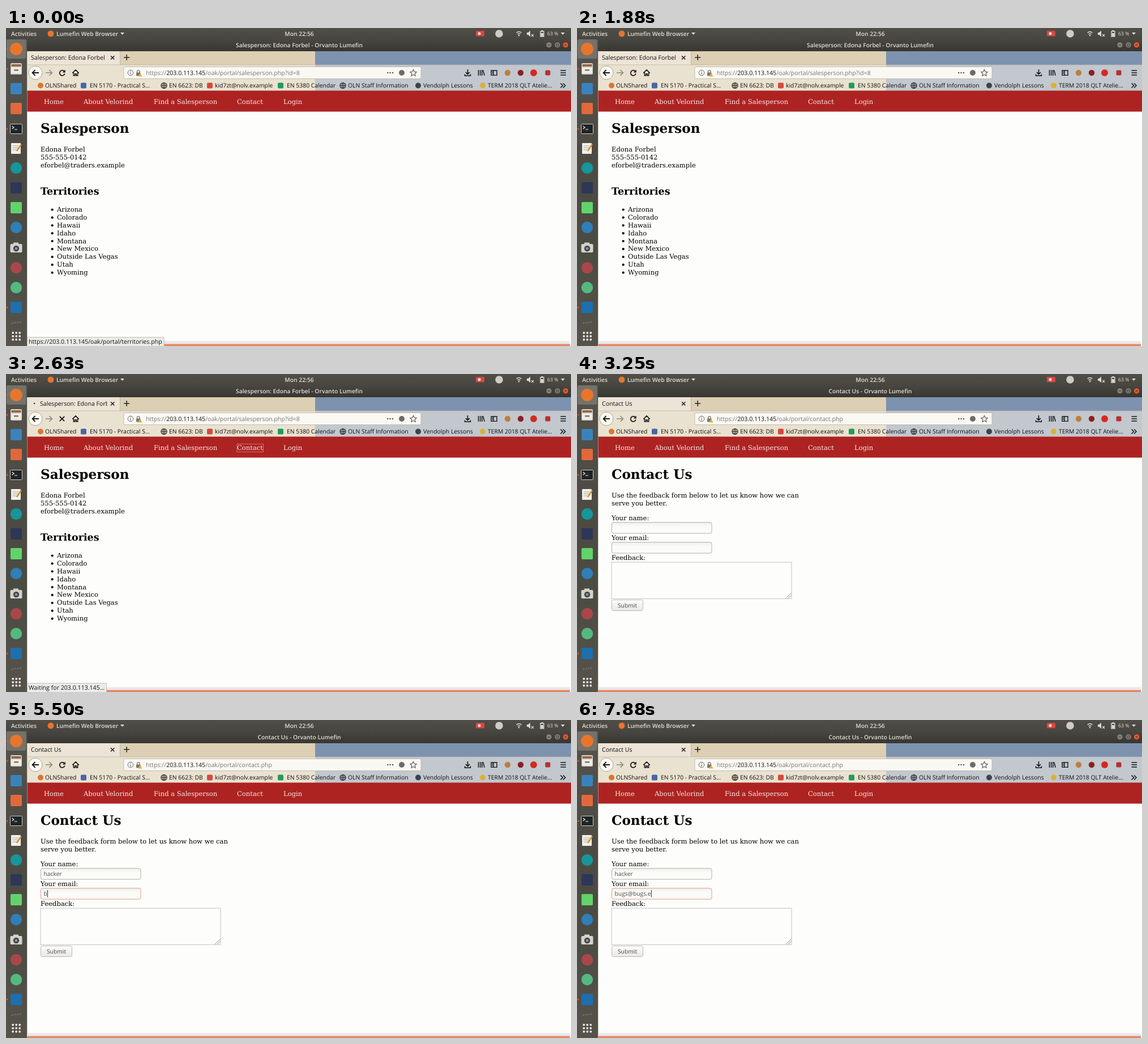
Animation, 998 px wide and 561 px high, one loop 8000 ms. Source, as an HTML page:

```html
<!DOCTYPE html>
<html lang="en">
<head>
<meta charset="utf-8">
<title>Contact form</title>
<style>
  html, body { margin: 0; width: 100%; height: 100%; overflow: hidden; background: #fdfdfb; }
  svg { display: block; width: 998px; height: 561px; }
  text { font: 10.6px "Open Sans", "Noto Sans", sans-serif; fill: #111; white-space: pre; text-rendering: geometricPrecision; }
  .panel { font-size: 10.3px; font-weight: 600; fill: #e2ded6; }
  .mark { font-size: 10.4px; }
  .page { font: 11.57px "DejaVu Serif", serif; fill: #000; }
  .nav { font: 11.57px "DejaVu Serif", serif; fill: #f5e6e4; }
  .h1 { font: bold 23.15px "DejaVu Serif", serif; fill: #000; }
  .h2 { font: bold 17.45px "DejaVu Serif", serif; fill: #000; }
  .field { font-size: 10.3px; fill: #4a4a48; }
  .faint { fill: #777; }
</style>
</head>
<body>
<svg id="stage" viewBox="0 0 998 561">
  <defs>
    <linearGradient id="dock" x2="0" y2="1">
      <stop offset="0" stop-color="#55534b"/><stop offset=".35" stop-color="#4d4b43"/>
      <stop offset=".65" stop-color="#4b4b42"/><stop offset="1" stop-color="#56534b"/>
    </linearGradient>
    <linearGradient id="frame" x2="0" y2="1">
      <stop offset="0" stop-color="#504e47"/><stop offset=".5" stop-color="#474640"/><stop offset="1" stop-color="#383631"/>
    </linearGradient>
    <linearGradient id="button" x2="0" y2="1">
      <stop offset="0" stop-color="#fcfcfa"/><stop offset="1" stop-color="#e9e8e5"/>
    </linearGradient>
    <linearGradient id="input" x2="0" y2="1">
      <stop offset="0" stop-color="#f0f0ed"/><stop offset=".4" stop-color="#fbfbf8"/>
    </linearGradient>
    <clipPath id="tabClip"><rect x="40" y="42" width="139" height="22"/></clipPath>
  </defs>
</svg>
<script>
const stage = document.getElementById('stage');
const $ = id => document.getElementById(id);

const box = (x, y, w, h, fill, more = '') => `<rect x="${x}" y="${y}" width="${w}" height="${h}" fill="${fill}" ${more}/>`;
const dot = (x, y, r, fill, more = '') => `<circle cx="${x}" cy="${y}" r="${r}" fill="${fill}" ${more}/>`;
const line = (d, color = '#151515', width = 1.4, more = '') =>
  `<path d="${d}" fill="none" stroke="${color}" stroke-width="${width}" ${more}/>`;
const shape = (d, fill) => `<path d="${d}" fill="${fill}"/>`;
const text = (x, y, s, cls = '', more = '') => `<text x="${x}" y="${y}" class="${cls}" ${more}>${s}</text>`;
const tile = (x, y, size, fill) => box(x - size / 2, y - size / 2, size, size, fill, 'rx="2"');

const host = '203.0.113.145';
const base = `https://${host}/oak/portal/`;
const person = 'Edona Forbel';
const appName = 'Orvanto Lumefin';

function desktop() {
  let s = box(0, 0, 998, 41, 'url(#frame)') + box(0, 20, 37.5, 541, 'url(#dock)');
  s += text(9, 13.5, 'Activities', 'panel') + dot(79, 10, 5.5, '#e8752c')
    + text(89, 13.5, 'Lumefin Web Browser', 'panel') + shape('M202 8h7l-3.5 4z', '#e2ded6')
    + text(518, 13.5, 'Mon 22:56', 'panel', 'text-anchor="middle"');
  // status area
  s += box(830, 5, 15, 9.5, '#d94742', 'rx="1.5"') + dot(836, 9.8, 2.6, '#f3dcd8')
    + dot(871, 10, 6.8, '#cfccc5')
    + line('M901.5 8.5q4.5-4 9 0M903.5 11q2.5-2 5 0', '#dfdbd2', 1.5) + dot(906, 13.3, 1.2, '#dfdbd2')
    + shape('M920 8h2.5l3.5-3.5v11l-3.5-3.5H920z', '#dfdbd2') + line('M928 11l4 4m0-4l-4 4', '#dfdbd2', 1.1)
    + line('M944 6h6v9h-6zM945.5 4.6h3', '#dfdbd2', 1.4) + box(945, 9, 4, 5.5, '#dfdbd2')
    + text(956, 13.2, '63 %', 'panel', 'style="font-size:8.8px;font-weight:400"') + shape('M980 8h7l-3.5 4z', '#e2ded6');
  // window buttons
  s += text(518, 33.5, '', 'panel', 'id="title" text-anchor="middle"');
  [[959, '#85827a'], [974, '#85827a'], [988.5, '#e8592f']].forEach(([x, c]) => s += dot(x, 29.8, 5.3, c, 'stroke="#33312d"'));
  s += line('M956.5 30h5M972 28h4v4h-4zM986.5 27.8l4 4m0-4l-4 4', '#3a3833', 1);
  return s + dock();
}

function dock() {
  let s = box(1, 20, 34.5, 34, '#74726b', 'rx="3"') + dot(18, 37, 11, '#e8752c');
  // drawer, terminal, notepad, camera
  s += box(8, 62, 20, 20, '#d8d3c8', 'rx="2"') + box(9.5, 64, 17, 4, '#8f6a48') + box(9.5, 70, 17, 10, '#f0ede6') + box(14, 73, 8, 2.5, '#77736b')
    + box(7.5, 169.5, 21, 17, '#1f2426', 'rx="1" stroke="#cfcfca"') + line('M10.5 173l3.5 2.5-3.5 2.5M15 179h5', '#f4f4f0', 1.2)
    + box(9, 203, 17, 19, '#f3f1ea', 'rx="1"') + line('M11.5 208h11M11.5 211.5h11M11.5 215h8', '#a5a39b', 1) + line('M27 205l-8 12', '#d58c2e', 2.4)
    + box(7.5, 381, 21, 15, '#d3d2cd', 'rx="2"') + box(13, 378.5, 9, 4, '#d3d2cd') + dot(18, 389, 5.2, '#44474a') + dot(18, 389, 2.3, '#8e9ba3');
  [[107, '#3b82bd'], [142, '#e2683c'], [282, '#2d3758'], [317, '#62d36a'], [493, '#1d6fae']].forEach(([y, c]) => s += tile(18, y, 20, c));
  [[247, '#16969b'], [352, '#2f7fb8'], [423, '#a9474a'], [458, '#54b981']].forEach(([y, c]) => s += dot(18, y, 10.2, c));
  [37, 72, 178, 493].forEach(y => s += dot(2.2, y, 1.5, '#e0562c'));
  s += line('M10 522l3-3M14.5 521.5l3-3M19 521l3-3M23.5 520.5l3-3', '#98958c', 1);
  for (let i = 0; i < 9; i++) s += box(10.5 + i % 3 * 6, 536 + (i / 3 | 0) * 6, 3.4, 3.4, '#f1efea', 'rx="1"');
  return s;
}

function browser() {
  let s = box(37.5, 41, 960.5, 70, '#dccfb4') + box(546, 41, 452, 70, '#7d92ae')
    + box(37.5, 65, 960.5, 46, '#f4efe5', 'opacity=".58"')
    + box(37.5, 41, 163.5, 24, '#ece4d6') + line('M201.5 41v24M38 65h960', '#b9ae9b', .7);
  s += `<g clip-path="url(#tabClip)">${text(44, 56, '', '', 'id="tab"')}</g>` + dot(50, 52, 1.3, '#333', 'id="throbber"')
    + line('M185 49.2l6.4 6.4m0-6.4l-6.4 6.4') + line('M208.2 52h10M213.2 47v10', '#222', 1.5);
  // toolbar
  s += dot(52, 79, 12, '#fbf8f2', 'stroke="#aaa296"') + line('M58 79H47M51.6 74l-5 5 5 5', '#151515', 1.8)
    + line('M70 79h11M76.4 74l5 5-5 5', '#8d877d', 1.6)
    + `<g id="reload">${line('M103 76.5a4.6 4.6 0 1 0 .8 4', '#151515', 1.7)}${shape('M104.8 73.5v5h-5z', '#151515')}</g>`
    + line('M94.8 74.8l8.4 8.4m0-8.4l-8.4 8.4', '#151515', 1.8, 'id="stop"')
    + line('M117.2 79.5l5.8-5.6 5.8 5.6M119.4 78.5v5.5h2.4v-3h2.4v3h2.4v-5.5', '#151515', 1.6)
    + box(208, 68.5, 525, 21, '#faf8f3', 'rx="2" stroke="#b9b2a6" stroke-width=".8"')
    + dot(220, 79, 4.8, 'none', 'stroke="#666"') + line('M220 78.2v3.5M220 75.8v1.2', '#666', 1.2)
    + box(230, 78.5, 7.5, 6, '#777', 'rx="1"') + line('M231.6 79v-2.2a2.2 2.2 0 0 1 4.4 0V79', '#777', 1.4) + shape('M237 79.5l3.8 6h-7.6z', '#e6b02e')
    + text(247, 83, '', 'faint', 'id="url"');
  [674.3, 678.6, 683].forEach(x => s += dot(x, 79, 1.3, '#555'));
  s += dot(699, 79, 5, '#6b6b6b')
    + line('M719.5 73.4l1.7 3.7 4 .5-3 2.7.8 4-3.5-2-3.5 2 .8-4-3-2.7 4-.5z', '#555', 1.1)
    + line('M815.5 73v8M812 78l3.5 3.5L819 78M810.6 81.5v2.7h9.8v-2.7', '#151515', 1.6)
    + line('M834.5 74v10M837.7 74v10M840.8 74v10M842.6 74.3l2.6 9.5', '#151515', 1.5)
    + line('M857 75h10v8.4h-10zM861 75v8.4M858.5 77.5h1.5M858.5 80h1.5', '#151515', 1.4)
    + dot(886, 79, 5.2, '#b9803f') + dot(909, 79, 5.2, '#8c1f23') + dot(932, 79, 6, '#d5291f') + tile(957, 79, 9, '#b5312e')
    + line('M979.5 75h9.5M979.5 79h9.5M979.5 83h9.5', '#151515', 1.5);
  return s + bookmarks();
}

function bookmarks() {
  const globe = x => dot(x, 101.5, 5, 'none', 'stroke="#222" stroke-width="1.2"')
    + line(`M${x - 5} 101.5h10M${x} 96.5v10M${x} 96.5q-5 5 0 10q5-5 0-10`, '#222', .9);
  const round = c => x => dot(x, 101.5, 5, c), square = c => x => tile(x, 101.5, 10, c);
  return [
    [61, 69, 'OLNShared', round('#d9772f')],
    [137, 148, 'EN 5170 - Practical S…', square('#4767a5')],
    [279, 288, 'EN 6623: DB', globe],
    [360, 369, 'kid7zt@nolv.example', square('#d64a3e')],
    [485, 496, 'EN 5380 Calendar', square('#1f9d58')],
    [595, 604, 'OLN Staff Information', globe],
    [728, 737, 'Vendolph Lessons', round('#39434f')],
    [842, 851, 'TERM 2018 QLT Atelie…', round('#d9b13a')],
  ].map(([ix, tx, label, icon]) => icon(ix) + text(tx, 105, label, 'mark')).join('')
    + line('M979.5 97.5l4 4-4 4M984 97.5l4 4-4 4', '#151515', 1.5);
}

function site() {
  const nav = [[67, 'Home'], [137, 'About Velorind'], [261, 'Find a Salesperson'], [408, 'Contact'], [490, 'Login']];
  return box(37.5, 111, 960.5, 450, '#fdfdfb') + box(37.5, 110.5, 960.5, 37, '#ad2322')
    + nav.map(([x, s]) => text(x, 134.3, s, 'nav')).join('')
    + box(408, 123.5, 46.5, 14, 'none', 'id="focus" stroke="#e9c5c3" stroke-width=".8" stroke-dasharray="1 .6"')
    + box(37.5, 552.5, 958.5, 5, '#e9e8e8') + box(37.5, 557.5, 958.5, 3.5, '#e58661');
}

function personPage() {
  const places = ['Arizona', 'Colorado', 'Hawaii', 'Idaho', 'Montana', 'New Mexico', 'Outside Las Vegas', 'Utah', 'Wyoming'];
  return text(61, 185.3, 'Salesperson', 'h1')
    + [person, '555-555-0142', 'eforbel@traders.example'].map((s, i) => text(61, 218.3 + i * 13.9, s, 'page')).join('')
    + text(61, 294.3, 'Territories', 'h2')
    + places.map((s, i) => dot(81.7, 320.5 + i * 13.88, 2.1, '#000') + text(90, 324 + i * 13.88, s, 'page')).join('');
}

function contactPage() {
  const input = (id, y) => box(61.5, y, 176.5, 19.3, 'url(#input)', `id="${id}Box" rx="3" stroke-width=".9"`)
    + text(66.5, y + 13.6, '', 'field', `id="${id}"`);
  return text(61, 185.3, 'Contact Us', 'h1')
    + text(61, 218.3, 'Use the feedback form below to let us know how we can', 'page') + text(61, 232.2, 'serve you better.', 'page')
    + text(61, 258, 'Your name:', 'page') + input('name', 261.8)
    + text(61, 293, 'Your email:', 'page') + input('email', 296.8)
    + text(61, 328, 'Feedback:', 'page')
    + box(61, 332, 318, 64.3, '#fdfdfb', 'stroke="#bdbab5" stroke-width=".9"')
    + line('M369 395.5l9.5-9M373 395.5l5.5-5', '#8f8d89', 1)
    + box(61.5, 398.5, 55, 19, 'url(#button)', 'rx="3" stroke="#b5b2ad" stroke-width=".9"')
    + text(89, 412, 'Submit', 'field', 'text-anchor="middle"')
    + box(0, 0, .9, 13, '#222', 'id="caret"');
}

const group = (id, content) => `<g id="${id}">${content}</g>`;
stage.insertAdjacentHTML('beforeend', desktop() + browser() + site()
  + group('person', personPage()) + group('contact', contactPage())
  + group('status', box(37.5, 545.5, 0, 16, '#ecebe7', 'id="statusBox" stroke="#b9b6b0" stroke-width=".8"') + text(40, 557, '', '', 'id="statusText"')));

const statuses = [
  [0, base + 'territories.php'], [1250, base + 'contact.php'], [1750, ''],
  [2000, `Connecting to ${host}…`], [2130, `Performing a TLS handshake to ${host}…`],
  [2380, `The TLS handshake finished for ${host}…`], [2500, `Waiting for ${host}…`],
  [2750, `Transferring data from ${host}…`], [3000, ''],
];
const click = 2000, arrive = 2750, loaded = 3000;
const fields = {
  name: { word: 'hacker', keys: [3750, 3880, 4000, 4250, 4380, 4500], from: 3380, to: 4880, y: 261.8 },
  email: { word: 'bugs@bugs.e', keys: [5500, 5750, 5880, 6130, 6380, 6880, 7000, 7250, 7500, 7630, 7880], from: 4880, to: 8000, y: 296.8 },
};

const show = (id, on) => $(id).style.display = on ? '' : 'none';
const set = (id, attrs) => { for (const k in attrs) $(id).setAttribute(k, attrs[k]); };

function render(t) {
  const onContact = t >= arrive, loading = t >= click && t < loaded;
  const heading = onContact ? 'Contact Us' : `Salesperson: ${person}`;
  show('person', !onContact);
  show('contact', onContact);
  show('focus', t >= click && !onContact);
  show('throbber', loading);
  show('stop', loading);
  show('reload', !loading);
  $('title').textContent = `${heading} - ${appName}`;
  $('tab').textContent = heading;
  set('tab', { x: loading ? 60 : 44 });
  set('throbber', { cx: 50 + 4 * Math.cos((t - 2380) / 160) });
  $('url').innerHTML = base.replace(host, `<tspan fill="#111">${host}</tspan>`) + (onContact ? 'contact.php' : 'salesperson.php?id=8');

  const status = statuses.filter(s => s[0] <= t).pop()[1];
  show('status', status);
  $('statusText').textContent = status;
  set('status', { opacity: t >= 1630 && t < 1750 ? .6 : 1 });
  set('statusBox', { width: status ? $('statusText').getComputedTextLength() + 6 : 0 });

  show('caret', t >= fields.name.from);
  for (const id in fields) {
    const { word, keys, from, to, y } = fields[id], active = t >= from && t < to;
    $(id).textContent = word.slice(0, keys.filter(k => k <= t).length);
    set(id + 'Box', { stroke: active ? '#dd9379' : '#aaa7a1' });
    if (active) set('caret', { x: 66.8 + $(id).getComputedTextLength(), y: y + 3 });
  }
}

function tick() {
  render(performance.now() % 8000);
  requestAnimationFrame(tick);
}
tick();
</script>
</body>
</html>
```
